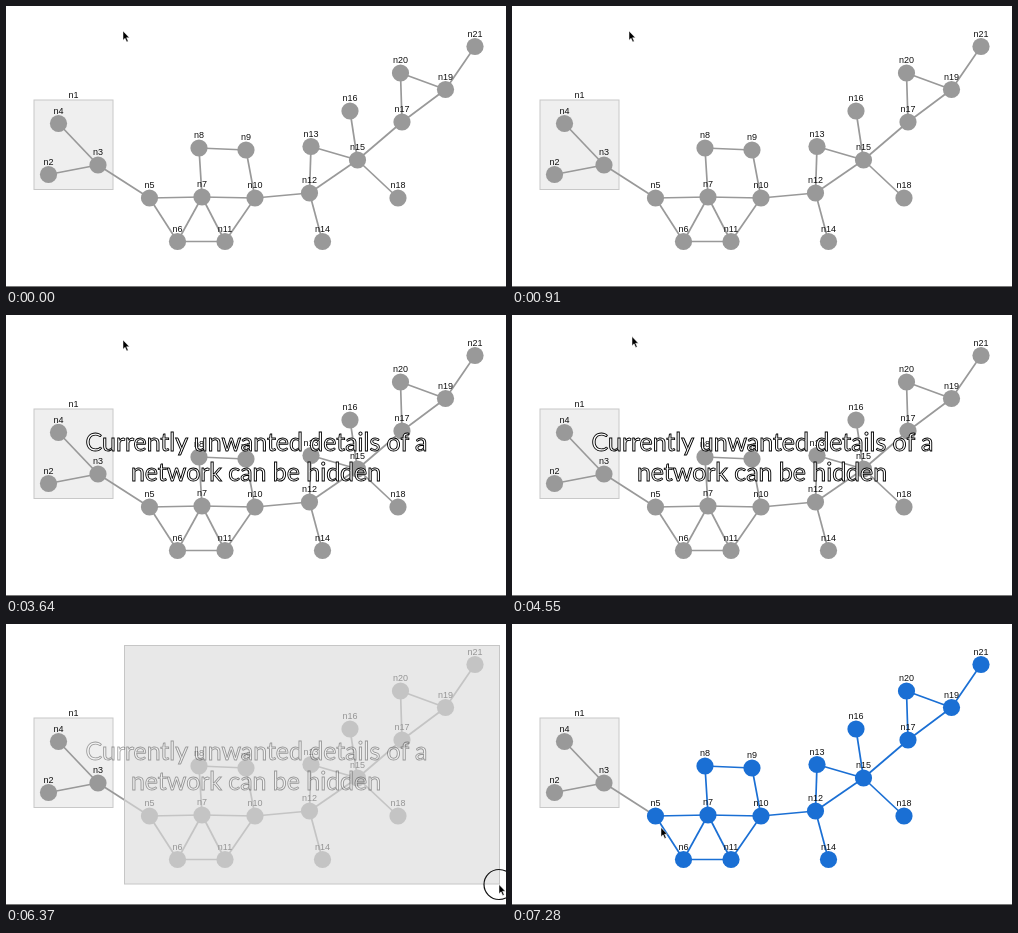
An HTML page that plays this animation: 500 px wide and 281 px high, repeating every 8000 ms.

```html
<!DOCTYPE html>
<html lang="en">
<head>
<meta charset="utf-8">
<title>Hiding parts of a network</title>
<style>
html, body { margin: 0; width: 100%; height: 100%; overflow: hidden; background: #fff; }
svg { display: block; width: 100%; height: 100%; }
text { text-anchor: middle; }
.label { font: 9px "Liberation Sans", Arial, sans-serif; fill: #111; }
.title { font: 24.9px Lato, sans-serif; fill: #fff; stroke: #000; stroke-width: .9; }
</style>
</head>
<body>
<svg viewBox="0 0 500 281">
  <rect x="28" y="94" width="79" height="89.5" fill="#efefef" stroke="#c8c8c8"/>
  <text class="label" x="67.5" y="92">n1</text>
  <g id="edges" stroke-width="1.7"></g>
  <g id="nodes"></g>
  <g id="labels"></g>
  <rect id="area" x="118.5" y="21.5" fill="#dcdcdc" fill-opacity=".65" stroke="#c6c6c6"/>
  <g id="title" class="title">
    <text x="250.5" y="136.3">Currently unwanted details of a</text>
    <text x="250" y="166">network can be hidden</text>
  </g>
  <rect y="280" width="500" height="1" fill="#777"/>
  <g id="cursor">
    <circle id="press" r="15" fill="none" stroke="#111" stroke-width="1.2"/>
    <path d="M0 0V9.2L2.1 7.3L3.7 11L5.2 10.3L3.6 6.7H6.4Z" fill="#000" stroke="#fff" stroke-width=".5"/>
  </g>
</svg>
<script>
const get = id => document.getElementById(id);
const add = (parent, tag, attrs) => {
  const el = document.createElementNS("http://www.w3.org/2000/svg", tag);
  for (const key in attrs) el.setAttribute(key, attrs[key]);
  return get(parent).appendChild(el);
};

// Positions of n2, n3, ... n21
const points = [
  [42.5, 168.5], [92, 159], [52.5, 117.5], [143.5, 192], [171.5, 235.5],
  [196, 191], [193, 142], [240, 144], [249, 192], [219, 235.5],
  [303.5, 187], [305, 140.5], [316.5, 235.5], [351.5, 154], [344, 105],
  [396, 116], [392, 192], [439.5, 83.5], [394.5, 67], [469, 40.5]
];
const links = "2-3 4-3 3-5 5-7 5-6 6-7 6-11 7-11 7-8 8-9 9-10 7-10 10-11 10-12 12-13 " +
  "12-14 12-15 13-15 15-16 15-17 15-18 17-19 17-20 19-20 19-21";

const selectable = [];
for (const link of links.split(" ")) {
  const [a, b] = link.split("-").map(Number);
  const [x1, y1] = points[a - 2], [x2, y2] = points[b - 2];
  const line = add("edges", "line", { x1, y1, x2, y2 });
  line.style.stroke = "#999";
  if (a > 4) selectable.push(line);
}
points.forEach(([x, y], i) => {
  const dot = add("nodes", "circle", { cx: x, cy: y, r: 8.6 });
  dot.style.fill = "#999";
  if (i > 2) selectable.push(dot);
  add("labels", "text", { class: "label", x, y: y - 10 }).textContent = "n" + (i + 2);
});

const STEP = 910, LOOP = 8000;
const rest = { cursor: [117, 25], title: 0 };
const steps = [
  rest, rest, rest,
  { cursor: [117, 25], title: .35 },
  { cursor: [117, 25], title: 1 },
  { cursor: [120, 21.5], title: 1 },
  { cursor: [338.5, 231.5], title: 1, area: [201, 201] },
  { cursor: [493, 260.5], title: .35, area: [375, 238.5] },
  { cursor: [149, 203.5], title: 0, selected: true }
];

let shown;
function show({ cursor, title, area, selected }) {
  get("cursor").setAttribute("transform", `translate(${cursor})`);
  get("title").style.opacity = title;
  get("press").style.display = get("area").style.display = area ? "" : "none";
  if (area) {
    get("area").setAttribute("width", area[0]);
    get("area").setAttribute("height", area[1]);
  }
  const color = selected ? "#1a6fd4" : "#999";
  for (const el of selectable) el.style[el.tagName === "line" ? "stroke" : "fill"] = color;
}

const start = performance.now();
function tick() {
  const t = (performance.now() - start) % LOOP;
  const step = steps[Math.floor(t / STEP)];
  if (step !== shown) show(shown = step);
  requestAnimationFrame(tick);
}
tick();
</script>
</body>
</html>
```
